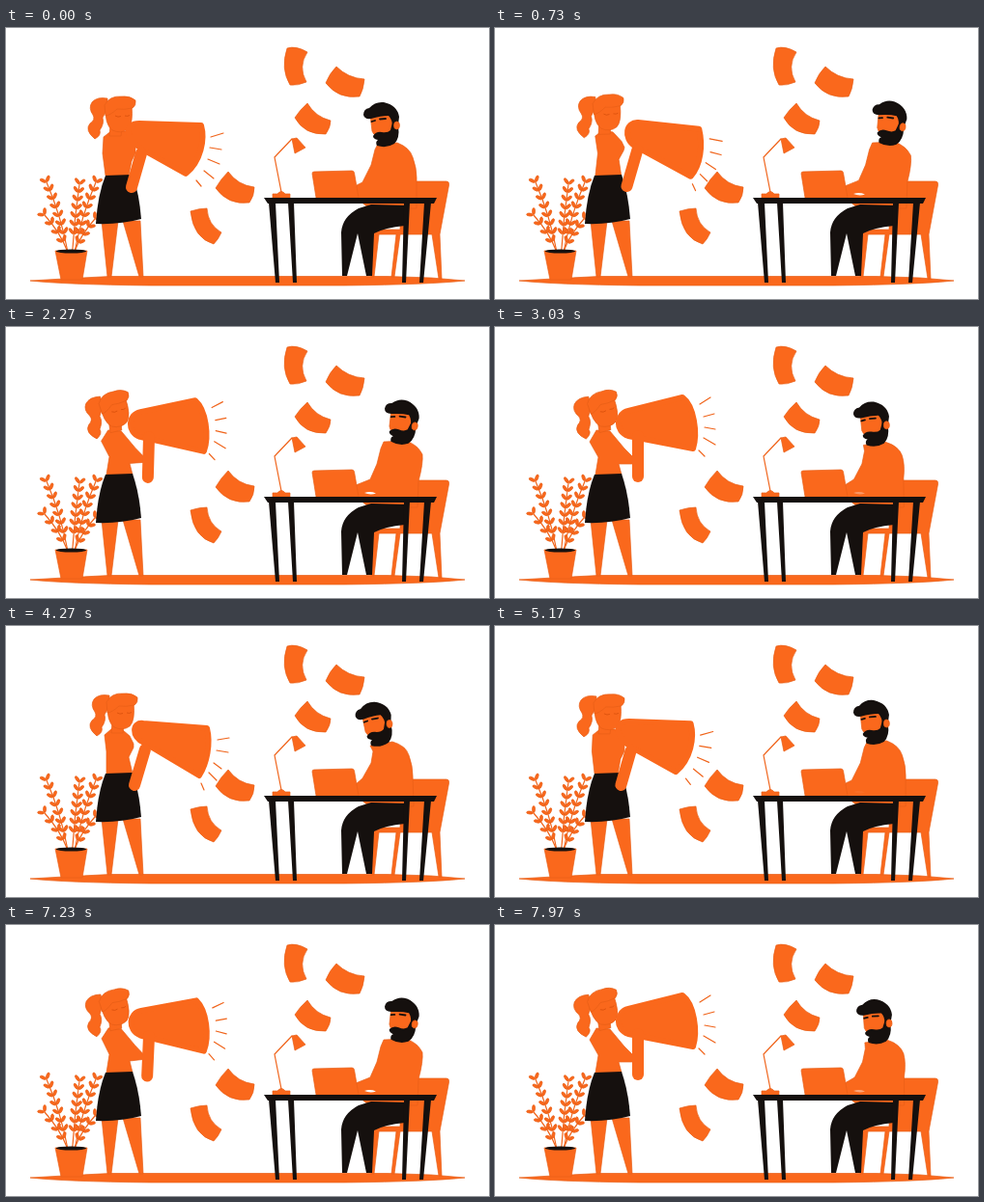
Write an HTML page that moves like this. It is 500x281 px and loops after 8 s.

```html
<!DOCTYPE html>
<html lang="en">
<head>
<meta charset="utf-8">
<title>Megaphone and desk</title>
<style>
  html, body { margin: 0; width: 100%; height: 100%; overflow: hidden; background: #fff; }
  svg { display: block; width: 100vw; height: 100vh; }
  .o { fill: #fa681c; stroke: #e85f17; stroke-width: .7; stroke-linejoin: round; }
  .k { fill: #15100e; }
  .line { fill: none; stroke: #f0641b; stroke-width: 1.2; stroke-linecap: round; }
  .brow { fill: none; stroke: #15100e; stroke-width: 1.8; stroke-linecap: round; }
  .lash { fill: none; stroke: #d9500c; stroke-width: .8; }
</style>
</head>
<body>
<svg viewBox="0 0 500 281" preserveAspectRatio="none">
  <path class="o" d="M25 262L60 260L108 257.500H395L440 259L475 262Q440 266 350 267H150Q60 266 25 262Z"/>

  <g id="plant"></g>
  <path class="o" d="M51 231H84L79 261H57Z"/>
  <ellipse class="k" cx="67.5" cy="231.5" rx="15.5" ry="2"/>

  <g class="o">
    <path d="M291 21Q300 18 312 25Q302 40 311 56Q302 60 294 59Q284 42 291 21Z"/>
    <path d="M342 40Q354 52 371 53Q370 64 366 71Q344 74 331 57Q335 47 342 40Z"/>
    <path d="M312 78Q320 92 336 96Q336 103 331 110Q309 111 299 93Q304 85 312 78Z"/>
    <path d="M230 149Q240 163 257 165Q257 174 252 181Q230 184 217 166Q222 157 230 149Z"/>
    <path d="M208 187Q209 204 223 212Q220 219 215 224Q194 218 191 190Q200 187 208 187Z"/>
  </g>

  <!-- woman -->
  <path class="o" d="M99 200H116L109 258H105ZM121 200H139L142 258H138Z"/>
  <path class="o" id="torso"/>
  <path class="k" d="M103 153L131 152Q138 172 140 198Q118 204 93 203Q95 172 103 153Z"/>
  <g id="womanHead">
    <path class="o" d="M105 73Q94 71 89 77Q85 83 90 90Q93 95 87 99Q81 106 92 115Q99 111 97 106Q102 99 100 93Q104 87 105 80Z"/>
    <path class="o" d="M108 100L107 112H119L120 104Z"/>
    <path class="o" d="M103 80L130 80Q132 99 126 105Q119 110 110 106Q102 100 103 80Z"/>
    <path class="o" d="M102 80Q107 70 120 71Q128 70 134 75Q135 80 131 83Q122 85 115 84Q107 91 103 91Z"/>
    <path class="lash" d="M113 91Q116 93 119 91.500M123 91Q126 92 128 90.500"/>
  </g>
  <path id="horn" fill="#fa681c" stroke="#fa681c" stroke-width="6" stroke-linejoin="round"/>
  <path id="handle" fill="none" stroke="#fa681c" stroke-width="12" stroke-linecap="round"/>
  <path class="line" id="rays"/>

  <!-- man, chair and desk -->
  <path class="o" d="M408 159H456Q459 159 458.500 163L449 214L451 260H448L441 214H408L402 258H399L404 214H386L381 258H378L380 209H408Z"/>
  <path class="o" id="body"/>
  <path class="k" d="M378 183L415 184L413 205Q392 207 381 213L379 257H373L364 213L353 257H348L347 212Q348 196 365 187Z"/>
  <path id="gap" fill="#fff" d="M371 172Q377 170 383 172.500Q377 174.500 371 172Z"/>
  <g id="manHead">
    <path class="o" d="M377 90L379 107Q382 114 390 114L403 109L404 90Z"/>
    <path class="k" d="M370 90Q370 84 376 83Q382 76 391 77Q405 80 407 92L406 100L400 102Q400 95 396 91Q388 91 378 94Q371 95 370 90Z"/>
    <path class="k" d="M380 112Q383 107 389 108Q395 109 398 106L400 98L406 102Q408 114 402 120Q394 125 384 122Q382 118 385 116Q380 115 380 112Z"/>
    <ellipse class="o" cx="404.500" cy="101" rx="3" ry="4"/>
    <path class="brow" d="M378.500 97L382 96M387 94.500L393 94"/>
  </g>
  <path class="o" d="M319 149L358 148Q360 148 360.500 150L365 176H321L317 151Q317 149 319 149Z"/>
  <path class="line" d="M285 170L278 134L296 115"/>
  <path class="o" d="M296 115L301 114L310 124L299 130Z"/>
  <path class="o" d="M276 176V172H281Q285 167 289 172H294V176Z"/>
  <path class="k" d="M267 176H446L443 182H271ZM272 181H279L283 264H279ZM292 181H298L301 264H297ZM412 181H418L414 264H410ZM433 181H440L432 264H428Z"/>
</svg>
<script>
const LOOP = 8000, CYCLE = 5000;
const $ = id => document.getElementById(id);

// [time, pose] pairs
const WOMAN = [[0, 0], [50, 0], [870, 1], [1750, 1], [2400, 2], [3150, 2], [4150, 3], [4300, 3], [5000, 0]];
const MAN = [[0, 0], [70, 0], [850, 1], [2500, 1], [3350, 2], [4350, 2], [5000, 0]];

const tracks = [
  ['torso', 'd', WOMAN, [
    'M101 113L110 106L124 107L131 112L134 122L134 130L130 138L127 153L103 153L100 130Z',
    'M104 112L112 106L122 108L131 118L134 124L133 127L128 136L131 153L104 153L107 130Z',
    'M98 119L105 107L119 108L134 126L144 136L143 142L128 142L131 153L104 153L107 135Z',
    'M102 113L110 106L121 108L128 114L132 122L132 126L127 136L131 153L104 153L104 130Z']],
  ['womanHead', 'transform', WOMAN, [
    'translate(0 0) rotate(0 114 108)',
    'translate(0 -2) rotate(-2 114 108)',
    'translate(0 -4) rotate(-14 114 108)',
    'translate(2 -1) rotate(0 114 108)']],
  ['horn', 'd', WOMAN, [
    'M138 99L202 101C206 115 202 138 186 151L145 128C122 115 122 99 138 99Z',
    'M149 98L212 105C216 122 214 142 204 154L145 122C133 114 137 97 149 98Z',
    'M138 87L194 73C206 82 210 110 205 126L138 113C124 108 125 90 138 87Z',
    'M142 101L208 106C212 122 208 142 200 155L143 121C129 115 131 99 142 101Z']],
  ['handle', 'd', WOMAN, [
    'M140 130L130 165', 'M148 126L137 164', 'M148 113L148 155', 'M144 128L133 165']],
  ['rays', 'd', WOMAN, [
    'M212 113L225 109M211 124L223 126M209 136L221 141M205 148L215 156M197 158L202 164',
    'M223 115L236 118M224 129L235 132M219 140L229 147M213 152L220 159M205 162L208 169',
    'M212 80L223 73M216 93L227 90M217 104L228 106M216 115L228 122M211 128L217 134',
    'M219 118L231 116M218 129L230 131M215 142L223 148M210 152L218 160M202 163L205 170']],
  ['body', 'd', MAN, [
    'M385 120L405 119Q418 124 421 134Q425 145 425 155L425 187L376 187L361 175L363 163L369 160L378 142L382 126Z',
    'M391 119L414 118Q426 122 431 132Q432 141 427 160L426 187L376 187L361 175L362 164L377 158L384 142L388 126Z',
    'M377 124L400 120Q414 124 417 134Q421 145 421 155L422 187L376 187L361 175L362 164L369 158L378 142L380 130Z']],
  ['manHead', 'transform', MAN, [
    'translate(0 0) rotate(0 398 118)',
    'translate(15 0) rotate(13 398 118)',
    'translate(-6 1) rotate(-5 398 118)']],
  ['gap', 'opacity', MAN, ['0', '1', '0']]
];

const NUMBER = /-?\d+(\.\d+)?/g;
function blend(from, to, k) {
  const ends = to.match(NUMBER);
  let i = 0;
  return from.replace(NUMBER, n => (+n + (ends[i++] - n) * k).toFixed(2));
}

function poseAt(time, keys, poses) {
  const i = Math.max(1, keys.findIndex(key => key[0] >= time));
  const [t0, a] = keys[i - 1], [t1, b] = keys[i];
  const u = (time - t0) / (t1 - t0);
  return blend(poses[a], poses[b], u * u * (3 - 2 * u));
}

// Each stem bends outwards: tip x, tip y, number of leaf pairs
function growPlant() {
  const stems = [[42, 160, 7], [76, 162, 7], [93, 160, 7], [40, 194, 4], [92, 198, 4]];
  let art = '';
  for (const [x, y, pairs] of stems) {
    const x0 = 67.5 + (x - 67.5) * .15, y0 = 231;
    const cx = x0 + (x - x0) * .3, cy = y0 + (y - y0) * .5;
    const curve = (a, b, c, k) => (1 - k) ** 2 * a + 2 * k * (1 - k) * b + k * k * c;
    const slope = (a, b, c, k) => (1 - k) * (b - a) + k * (c - b);
    art += `<path class="line" d="M${x0} ${y0}Q${cx} ${cy} ${x} ${y}"/>`;
    for (let i = 0; i < pairs; i++) {
      const k = .25 + .75 * i / (pairs - 1);
      const tilt = Math.atan2(slope(y0, cy, y, k), slope(x0, cx, x, k)) * 180 / Math.PI;
      for (const side of [-42, 42])
        art += `<ellipse class="o" cx="4" rx="3.400" ry="1.500" transform="translate(${curve(x0, cx, x, k)} ${curve(y0, cy, y, k)}) rotate(${tilt + side})"/>`;
    }
  }
  $('plant').innerHTML = art;
}

function draw(now) {
  const time = now % LOOP % CYCLE;
  for (const [id, attr, keys, poses] of tracks)
    $(id).setAttribute(attr, poseAt(time, keys, poses));
}

const start = performance.now();
function tick() {
  draw(performance.now() - start);
  requestAnimationFrame(tick);
}

growPlant();
draw(0);
requestAnimationFrame(tick);
</script>
</body>
</html>
```
